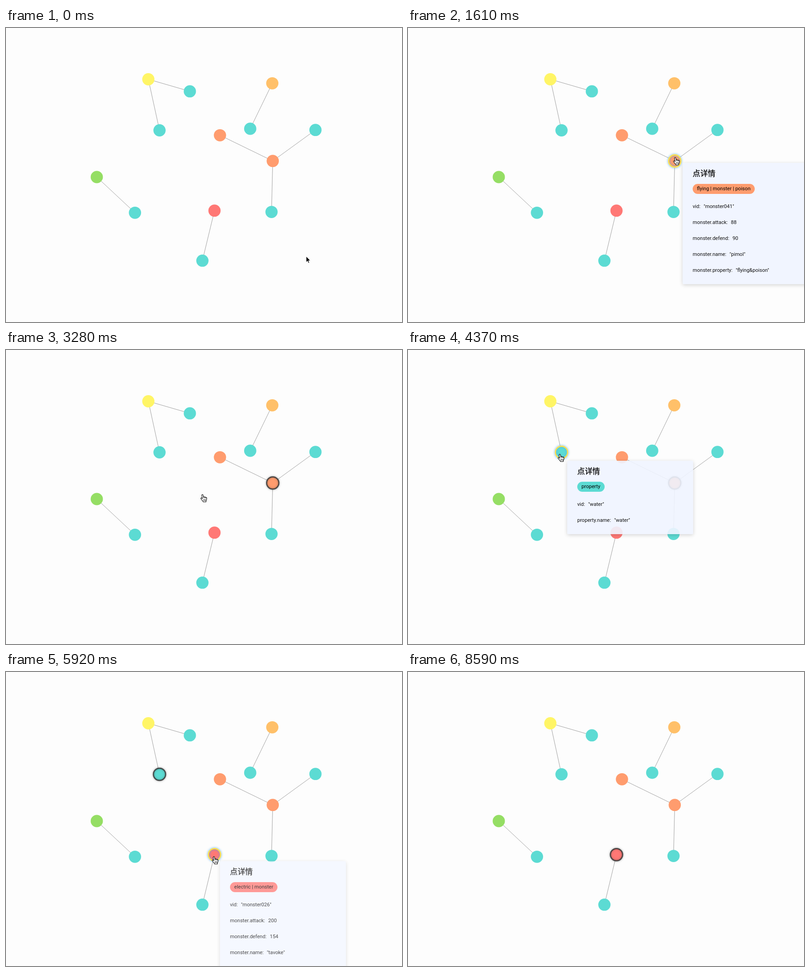
Animation, 868 px wide and 645 px high, one loop 9.49 s. Source, as an HTML page:

```html
<!DOCTYPE html>
<html lang="zh-CN">
<head>
<meta charset="utf-8">
<style>
html, body { margin: 0; width: 100%; height: 100%; overflow: hidden; background: #fdfdfd; }
#stage { position: fixed; inset: 0; overflow: hidden; contain: strict; }
svg { position: absolute; left: 0; top: 0; width: 100%; height: 100%; }
.panel {
  position: absolute; width: 276px; border-radius: 3px; opacity: 0;
  background: rgba(240, 244, 255, .9); box-shadow: 0 2px 8px rgba(0, 0, 0, .17);
  font: 11.08px/35px Roboto, sans-serif; color: #111; white-space: nowrap;
}
.panel > * { position: absolute; left: 22px; }
.title {
  top: 10px; font: 16.67px/24px "Noto Sans CJK SC", "Noto Sans CJK", sans-serif;
  color: #000; -webkit-text-stroke: .25px #000;
}
.tag { top: 46px; padding: 0 9.3px; border-radius: 11px; line-height: 22px; color: #000; }
.row span { margin-left: 7px; }
.hover { stroke: #ffe04d; filter: drop-shadow(0 0 2.5px #4aa8f0); }
.picked { stroke: #333; stroke-opacity: .82; filter: drop-shadow(0 0 2px rgba(60, 60, 60, .6)); }
</style>
</head>
<body>
<div id="stage">
  <svg id="graph"></svg>
  <svg id="pointer" stroke-linejoin="round">
    <path id="arrow" d="M0 0V13L3 10.2 4.9 14.8 7 14 5.1 9.4H9Z" stroke="#fff" stroke-width=".9"/>
    <g id="hand" stroke="#000" stroke-width="1.1" stroke-linecap="round">
      <path fill="#fff" d="M-1.9 1.5C-2 -.2 .8 -.3 1.1 1.4L2 5.6C2.2 4.6 4.2 4.7 4.4 6C4.9 5.2 6.6 5.4 6.8 6.6C7.6 6 9 6.5 9 7.8C9.1 10 8.8 12 7.6 13.6L7.4 16.2H1L.6 14.6C-1 13 -2.6 11 -3.9 9.2C-4.7 7.8 -3.1 6.8 -1.9 7.9L-.6 9.2Z"/>
      <path fill="none" stroke-width=".8" d="M2 5.6V8M4.4 6V8M6.8 6.6V8.4M2.2 10.7V13.6m2 -2.9v2.9m2 -2.9v2.9"/>
    </g>
  </svg>
</div>
<script>
const LOOP = 9490, FADE = 180, R = 13.4;
const teal = '#5cdbd3', coral = '#ff9c6e', red = '#ff7875';
const [stage, graph, pointer, arrow, hand] =
  ['stage', 'graph', 'pointer', 'arrow', 'hand'].map(id => document.getElementById(id));

const node = (x, y, color = teal) => ({ x, y, color });
const bat = node(584.7, 291.7, coral), water = node(336.5, 224.5), mouse = node(457, 400.7, red);

// Each hub with the nodes linked to it
const clusters = [
  [node(312, 112.5, '#fff566'), node(403, 138.9), water],
  [node(583.7, 121.3, '#ffc069'), node(535.3, 221)],
  [bat, node(469, 235.3, coral), node(678.3, 223.7), node(582, 403.6)],
  [node(199, 327, '#95de64'), node(282.7, 405.3)],
  [mouse, node(430.5, 510.4)]
];

const monster = (id, attack, defend, name, property) => ({
  vid: `"${id}"`, 'monster.attack': attack, 'monster.defend': defend,
  'monster.name': `"${name}"`, 'monster.property': `"${property}"`
});

// Panels open on hover; a click picks the node until the next click
const visits = [
  { at: bat, hover: 1410, click: 2100, hide: 2950, x: 602, y: 296, tag: 'flying | monster | poison',
    rows: monster('monster041', 88, 90, 'pimol', 'flying&poison') },
  { at: water, hover: 4180, click: 4600, hide: 5420, x: 349, y: 243, tag: 'property',
    rows: { vid: '"water"', 'property.name': '"water"' } },
  { at: mouse, hover: 5800, click: 6500, hide: 7850, x: 469, y: 415, tag: 'electric | monster',
    rows: monster('monster026', 200, 154, 'tavoke', 'electric') }
];

const home = [658, 501];
const move = (from, to, x, y) => ({ from, to, x, y });
const moves = [
  move(930, 1280, 596, 267), move(1280, 1460, 586, 284),
  move(2690, 3280, 431, 317), move(3450, 3880, 351, 244),
  move(4120, 4370, 333, 228.5), move(5110, 5350, 337.5, 325),
  move(5400, 5850, 456, 405), move(7220, 7460, 658, 482),
  move(7760, 8040, 784, 603), move(8270, 8410, 803, 557), move(8410, 8590, 815, 652)
];

function add(parent, name, attrs) {
  const el = document.createElementNS('http://www.w3.org/2000/svg', name);
  for (const k in attrs) el.setAttribute(k, attrs[k]);
  return parent.appendChild(el);
}

function addDiv(parent, cls, text = '') {
  const el = parent.appendChild(document.createElement('div'));
  el.className = cls;
  el.textContent = text;
  return el;
}

const addCircle = (n, attrs) => add(graph, 'circle', { cx: n.x, cy: n.y, r: R, ...attrs });

for (const [hub, ...leaves] of clusters) {
  for (const leaf of leaves) {
    add(graph, 'line', { x1: hub.x, y1: hub.y, x2: leaf.x, y2: leaf.y, stroke: '#8f8f8f', 'stroke-width': .85 });
  }
  for (const n of [hub, ...leaves]) addCircle(n, { fill: n.color });
}

visits.forEach((v, i) => {
  const rows = Object.entries(v.rows);
  v.end = visits[i + 1]?.click ?? LOOP;
  v.ring = addCircle(v.at, { fill: 'none', 'stroke-width': 2.7 });
  v.panel = addDiv(stage, 'panel');
  v.panel.style.cssText = `left:${v.x}px;top:${v.y}px;height:${91 + 35 * rows.length}px`;
  addDiv(v.panel, 'title', '点详情');
  addDiv(v.panel, 'tag', v.tag).style.background = v.at.color;
  rows.forEach(([key, value], j) => {
    const row = addDiv(v.panel, 'row', key + ':');
    row.style.top = 77.5 + 35 * j + 'px';
    row.appendChild(document.createElement('span')).textContent = value;
  });
});
stage.appendChild(pointer);

// Eased progress from 0 to 1
function ramp(t, from, to) {
  const k = Math.min(1, Math.max(0, (t - from) / (to - from)));
  return k * k * (3 - 2 * k);
}

function tip(t) {
  let [x, y] = home;
  for (const m of moves) {
    const k = ramp(t, m.from, m.to);
    x += (m.x - x) * k;
    y += (m.y - y) * k;
  }
  return [x, y];
}

function draw(t) {
  for (const v of visits) {
    v.ring.style.display = t >= v.hover && t < v.end ? '' : 'none';
    v.ring.setAttribute('class', t < v.click ? 'hover' : 'picked');
    v.panel.style.opacity = ramp(t, v.hover, v.hover + FADE) - ramp(t, v.hide, v.hide + FADE);
  }
  const plain = t < visits[0].hover || (t > 7290 && t < 7920);
  arrow.style.display = plain ? '' : 'none';
  hand.style.display = plain ? 'none' : '';
  for (const el of [arrow, hand]) el.setAttribute('transform', `translate(${tip(t)})`);
}

const start = performance.now();
function tick() {
  draw((performance.now() - start) % LOOP);
  requestAnimationFrame(tick);
}
tick();
</script>
</body>
</html>
```
